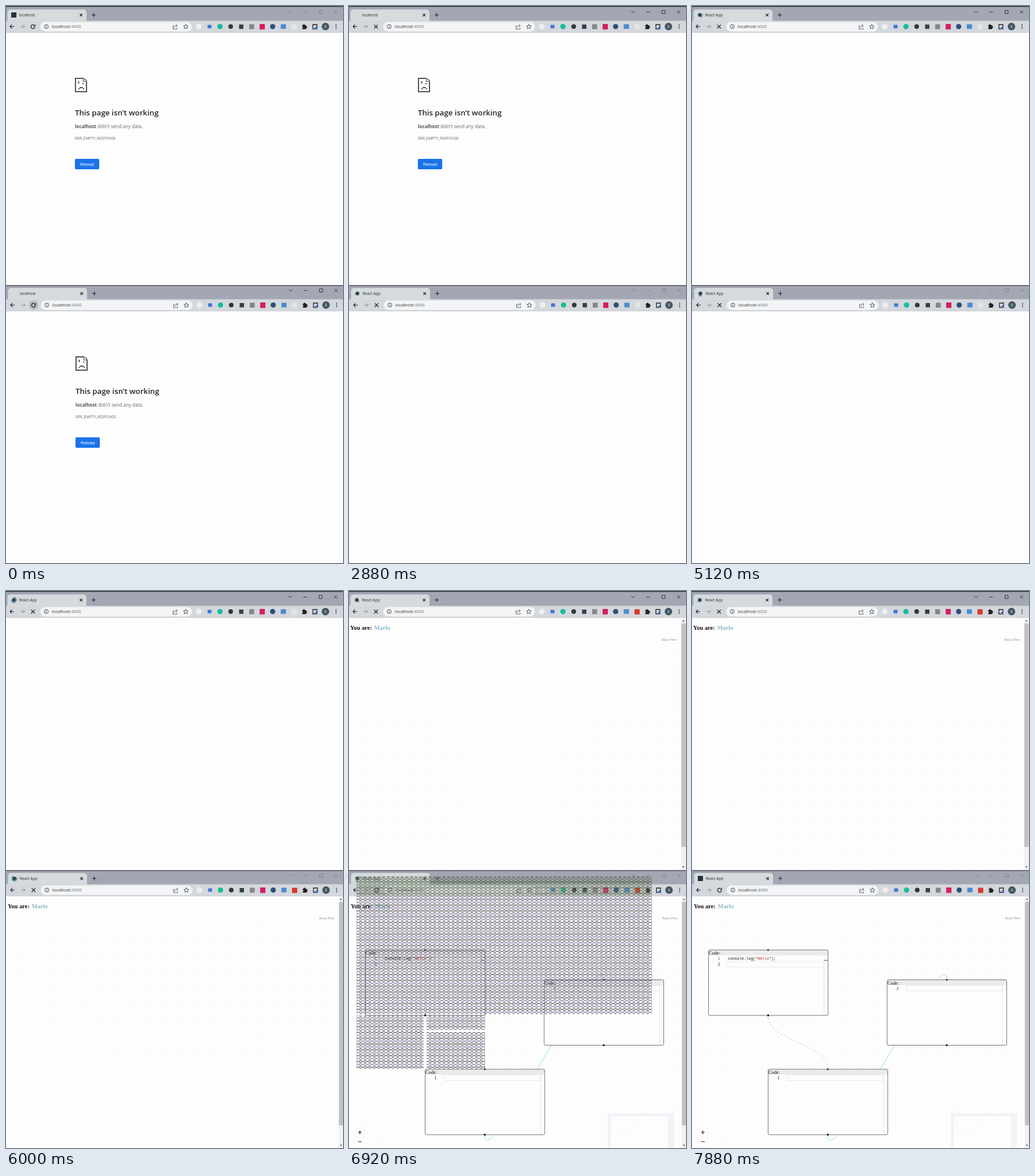
Recreate the animation shown at these times as an HTML page with a canvas. Size 582 by 962 pixels, loop 8000 ms.

```html
<!DOCTYPE html>
<html>
<head>
<meta charset="utf-8">
<style>
html, body { margin: 0; width: 100%; height: 100%; overflow: hidden; background: #fdfdfd; }
canvas { display: block; }
</style>
</head>
<body>
<canvas id="stage" width="582" height="962"></canvas>
<script>
const g = document.getElementById('stage').getContext('2d');
const LOOP = 8000, TAU = Math.PI * 2, RAD = Math.PI / 180;
const UI = '"Open Sans", "Noto Sans", sans-serif';
const SERIF = '"Liberation Serif", serif';
const MONO = '"Liberation Mono", monospace';

// Times (ms) at which each browser window changes state.
const windows = [
  { x: 0, y: 0, click: 1440, unhover: 2080, commit: 4080, content: 6560, nodes: Infinity, loaded: Infinity, icon: Infinity,
    focused: t => t >= 1440 },
  { x: 1, y: 481, click: -40, unhover: 600, commit: 1400, content: 5240, nodes: 6400, loaded: 6760, icon: 7280,
    focused: t => t < 1440 }
];

function rect(x, y, w, h, color, r = 0) {
  g.fillStyle = color;
  g.beginPath();
  g.roundRect(x, y, w, h, r);
  g.fill();
}
function disc(x, y, r, color) {
  g.fillStyle = color;
  g.beginPath();
  g.arc(x, y, r, 0, TAU);
  g.fill();
}
function stroke(path, color, width = 1) {
  g.strokeStyle = color;
  g.lineWidth = width;
  g.stroke(new Path2D(path));
}
function ring(x, y, r, color, width = 1, from = 0, to = TAU) {
  g.strokeStyle = color;
  g.lineWidth = width;
  g.beginPath();
  g.arc(x, y, r, from, to);
  g.stroke();
}
function text(s, x, y, font, color, align = 'left') {
  g.font = font;
  g.fillStyle = color;
  g.textAlign = align;
  g.fillText(s, x, y);
}

const ease = p => p < .5 ? 4 * p ** 3 : 1 - (2 - 2 * p) ** 3 / 2;

function tabIcon(w, t) {
  const x = 13.5, y = 15.5;
  if (t < w.click || t >= w.icon) return rect(9, 11, 9, 9, '#263038', 1);
  if (t < w.commit) {
    const age = t - w.click, start = -90 - age / 1320 * 360;
    return ring(x, y, 4.5, '#b3b4da', 1, start * RAD, (start + Math.min(90, age / 5)) * RAD);
  }
  const age = t - w.commit, cycle = age / 666.5 % 2, turns = Math.floor(age / 1333);
  const base = -90 + age / 1568 * 360 + 270 * turns;
  const tail = base + 270 * ease(Math.max(0, cycle - 1));
  const head = base + 270 * ease(Math.min(1, cycle)) + 6;
  disc(x, y, 3.2, '#2c4450');
  ring(x, y, 4.4, '#3e7fae', 1.2, tail * RAD, head * RAD);
}

function reloadButton(w, t) {
  if (t >= w.click && t < w.unhover) disc(46.5, 35.5, 8, '#b9bcc3');
  if (t < w.unhover || t >= w.loaded) {
    ring(46.5, 35.7, 3.3, '#222', 1.2, 0.2, 5.4);
    stroke('M50.2 31.8v3h-3', '#222', 1.2);
  } else {
    stroke('M43.4 32.4l6.4 6.4m0-6.4l-6.4 6.4', '#222', 1.3);
  }
}

function toolbar(w, t) {
  const y = 35.5;
  stroke('M14 35.5H7M10.2 32.2L7 35.5l3.2 3.3', '#222', 1.2);
  stroke('M25 35.5h7M28.8 32.2l3.2 3.3l-3.2 3.3', '#8b8d93', 1);
  reloadButton(w, t);
  rect(59, 27.5, 262, 16.5, '#f2f4f5', 8.2);
  ring(69.5, y, 3.5, '#4b4e52');
  rect(69, 35, 1, 2.5, '#4b4e52');
  rect(69, 33.3, 1, 1, '#4b4e52');
  text('localhost', 79, 38.3, '7.5px ' + UI, '#333');
  const host = g.measureText('localhost').width;
  text(':4000', 79 + host, 38.3, '7.5px ' + UI, '#6c6f73');
  stroke('M290.5 34h-2v6h7v-2.5M290.5 37.5c.3-2.5 2-3.5 4.5-3.5M293.5 31.8l2.5 2.2l-2.5 2.2', '#55585d', .9);
  stroke('M310.5 31.4l1.2 2.8l3 .2l-2.3 2l.8 3l-2.7-1.7l-2.7 1.7l.8-3l-2.3-2l3-.2z', '#3f4246', .9);

  disc(333, y, 5, '#eeeef0');
  rect(348, 32.5, 7, 6, '#4477d8', 1);
  disc(369.5, y, 4.6, '#16be97');
  disc(388, y, 4, '#333638');
  rect(402.5, 32, 7.5, 7.5, '#31414a');
  rect(420, 31.5, 8.5, 8.5, '#85868a');
  rect(438, 31, 9, 9.5, '#d51f62', .5);
  disc(460.5, y, 4.5, '#2c5077');
  rect(474.5, 31.5, 9, 8, '#4b8ad0', 1);
  rect(493, 31.5, 9, 9, t >= w.content ? '#d8392b' : '#e2e4e6', 1);

  rect(511.5, 33, 7, 7, '#222', .8);
  disc(514.5, 32.8, 1.5, '#222');
  disc(518.5, 36.2, 1.5, '#222');
  disc(511.5, 36.8, 1.2, '#d3d6db');
  stroke('M530 32h7v7.5h-7z', '#222', 1.3);
  rect(534, 36, 3.5, 4, '#2a6fd6');
  disc(551.7, y, 6.5, '#43575f');
  text('X', 551.7, 38, '6.5px ' + UI, '#fff', 'center');
  for (const d of [-3, 0, 3]) disc(570, y + d, .9, '#333');
}

function browserFrame(w, t) {
  rect(-1, 1, 584, 25, '#a3a7b4');
  rect(-1, 25.5, 584, 20.5, '#d4d7dc');
  rect(-1, 45.5, 584, .7, '#c4c7cb');
  rect(2.5, 6, 136.5, 21, '#d5dadc', [5, 5, 0, 0]);
  tabIcon(w, t);
  text(t < w.commit ? 'localhost' : 'React App', 22.5, 18, '6.6px ' + UI, '#2b2d30');
  stroke('M127.5 13.5l4.4 4.4m0-4.4l-4.4 4.4', '#222', 1.2);
  stroke('M148 15.5h7m-3.5-3.5v7', '#222', 1.1);
  const c = w.focused(t) ? '#25272c' : '#7d818d';
  stroke('M487.5 8.5l3.2 3l3.2-3M513.5 10.5h6M540.5 7.5h5.5v5.5h-5.5zM566.5 7.5l5.5 5.5m0-5.5l-5.5 5.5', c, .9);
  toolbar(w, t);
}

function errorPage() {
  const c = '#535353';
  stroke('M134 125H120V148h19v-17', c, 2);
  stroke('M133.5 124v6.5h6M135 125.5h1v1.5h1.5v1.5h1.5v2.5', c, 1.2);
  rect(124.5, 130, 2, 4, c);
  rect(132, 133, 2, 2, c);
  rect(127, 140, 6, 2, c);
  rect(125, 142, 2, 2, c);
  rect(133, 142, 2, 2, c);
  text('This page isn’t working', 119, 188.7, '600 13.2px ' + UI, '#222426');
  text('localhost', 119, 211, '700 8.1px ' + UI, '#55575a');
  const x = 119 + g.measureText('localhost').width;
  text(' didn’t send any data.', x, 211, '8.1px ' + UI, '#66686b');
  text('ERR_EMPTY_RESPONSE', 119, 231, '6.5px ' + UI, '#66686b');
  rect(119, 264, 42, 18, '#1a73e8', 2);
  text('Reload', 140, 276, '7.6px "Liberation Sans", sans-serif', '#fff', 'center');
}

function flowPage() {
  for (let y = 89; y < 481; y += 9.15)
    for (let x = 11; x < 570; x += 9.15) rect(Math.round(x), Math.round(y), 1, 1, '#ebebec');
  text('You are:', 2, 66.5, '700 10.4px ' + SERIF, '#111');
  text('Marlo', 43.5, 66.5, '700 10.4px ' + SERIF, '#8db9c8');
  text('React Flow', 540, 86, '5.8px ' + SERIF, '#8a8a8a');
  rect(573.5, 47, 9, 435, '#f1f1f1');
  rect(574, 56, 7.5, 386, '#c1c1c1');
  g.fillStyle = '#555';
  g.fill(new Path2D('M575.5 52.5l2-2.5l2 2.5zM575.5 475.5l2 2.5l2-2.5z'));
}

function editor(x, y, code) {
  rect(x, y, 206.5, 113, '#fdfdfd', 2);
  rect(x, y, 206.5, 9.5, '#ebebeb', [2, 2, 0, 0]);
  text('Code:', x + .5, y + 8, '8.3px ' + SERIF, '#111');
  const line = y + (code ? 20 : 10);
  g.strokeStyle = '#e9e9e9';
  g.lineWidth = 1;
  g.strokeRect(x + 33.5, line, 165.5, 9.5);
  stroke(`M${x + 199.5} ${y + 10}v102`, '#dedee2', .8);
  text('1', x + 16, y + 17, '6.57px ' + MONO, code ? '#237893' : '#0b216f');
  if (code) {
    text('2', x + 16, y + 27, '6.57px ' + MONO, '#0b216f');
    let pen = x + 33.5;
    for (const [part, color] of [['console.log(', '#111'], ['"Hello"', '#a31515'], [');', '#111']]) {
      text(part, pen, y + 17, '6.57px ' + MONO, color);
      pen += g.measureText(part).width;
    }
    rect(x + 199.5, y + 17.5, 6, 1, '#444');
  }
  g.strokeStyle = '#62626a';
  g.lineWidth = .9;
  g.beginPath();
  g.roundRect(x, y, 206.5, 113, 2);
  g.stroke();
  disc(x + 103, y, 1.7, '#444');
  disc(x + 103, y + 113, 1.7, '#111');
}

function flowGraph(t) {
  stroke('M233.5 458C233.5 537 439 112 439 191', '#8fe0d6', 1);
  g.setLineDash([3, 3]);
  g.lineDashOffset = -t / 500 * 6;
  stroke('M130.5 252C130.5 298.5 233.5 298.5 233.5 345', '#e3b78a', .9);
  g.setLineDash([]);
  editor(27.5, 139, true);
  editor(336, 190.5);
  editor(130.5, 345);
  rect(10, 446, 16, 33, '#fefefe');
  stroke('M10.5 446.5h15v32h-15zM10 462.5h16', '#eee', .8);
  stroke('M14.5 454h6.5m-3.25-3.25v6.5M14.5 470h6.5', '#222', 1.2);
  rect(446, 421, 114, 60, '#f0f3f7');
  rect(451, 426, 99, 55, '#fdfdfd');
  g.strokeStyle = '#f6f7f8';
  g.strokeRect(454.5, 432.5, 37, 20);
}

const lattice = (() => {
  const tile = document.createElement('canvas');
  tile.width = 8;
  tile.height = 10;
  const c = tile.getContext('2d');
  ['#3a3740', '#6a6284'].forEach((color, row) => {
    c.strokeStyle = color;
    c.lineWidth = .9;
    c.beginPath();
    c.ellipse(4, 2.5 + row * 5, 2.6, 1.7, 0, 0, TAU);
    c.stroke();
    c.fillStyle = color;
    c.fillRect(0, 2 + row * 5, 1, 1);
    c.fillRect(7, 2 + row * 5, 1, 1);
  });
  return g.createPattern(tile, 'repeat');
})();

function latticeOverlay() {
  for (const box of [[13, 493, 510, 238], [13, 733, 116, 92], [134, 733, 101, 25], [134, 762, 101, 63]]) {
    g.fillStyle = lattice;
    g.fillRect(...box);
  }
  rect(13, 493, 510, 33, 'rgba(110,150,70,.2)');
}

function draw(t) {
  rect(0, 0, 582, 962, '#fdfdfd');
  for (const w of windows) {
    g.save();
    g.translate(w.x, w.y);
    rect(-1, 1, 584, 481, '#fdfdfd');
    if (t < w.commit) errorPage();
    if (t >= w.content) flowPage();
    if (t >= w.nodes) flowGraph(t);
    browserFrame(w, t);
    g.restore();
  }
  rect(0, 0, 582, 1.5, '#34333c');
  rect(0, 482, 582, 1.5, '#55565d');
  if (t >= 6920 && t < 7280) latticeOverlay();
}

function tick() {
  draw(performance.now() % LOOP);
  requestAnimationFrame(tick);
}
tick();
</script>
</body>
</html>
```
